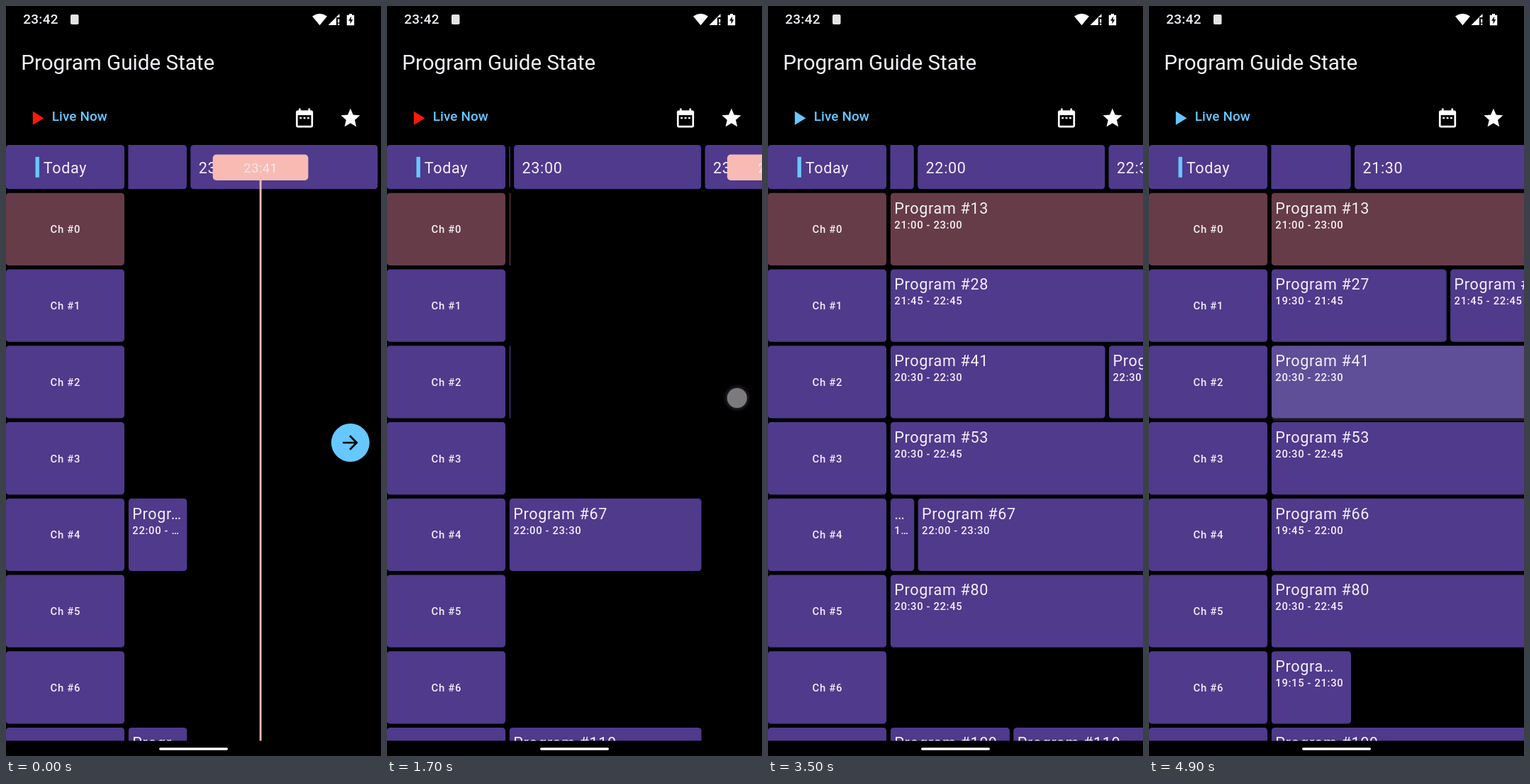
These frames come from a looping animation (529 px wide and 1058 px high, 5000 ms). An HTML page:

```html
<!DOCTYPE html>
<html lang="en">
<head>
<meta charset="utf-8">
<title>Program guide</title>
<style>
  html, body { margin: 0; width: 100%; height: 100%; overflow: hidden; background: #000; }
  #stage { display: block; width: 100vw; height: 100vh; }
  text { font-family: Roboto, sans-serif; fill: #f3f0f7; white-space: pre; }
  .body { font-size: 21.55px; letter-spacing: .67px; }
  .label { font-size: 14.8px; font-weight: 500; letter-spacing: .67px; }
</style>
</head>
<body>
<svg id="stage" viewBox="0 0 529 1058" xmlns="http://www.w3.org/2000/svg">
  <defs>
    <clipPath id="rowsClip"><rect y="190" width="529" height="846.5"/></clipPath>
    <clipPath id="gridClip"><rect x="172.4" y="190" width="357" height="846.5"/></clipPath>
    <radialGradient id="halo">
      <stop offset=".6" stop-color="#b4aad8" stop-opacity=".5"/>
      <stop offset="1" stop-color="#8070b0" stop-opacity="0"/>
    </radialGradient>
  </defs>
  <rect width="529" height="1058"/>

  <!-- status bar -->
  <text x="24.2" y="25.4" font-size="18.9" font-weight="500" letter-spacing=".35">23:42</text>
  <rect x="91" y="12" width="11.5" height="14" rx="2" fill="#e4e4e4"/>
  <g fill="#fff">
    <path d="M442.5 27.3L432 14.4Q442.5 7 453 14.4Z"/>
    <path d="M454.5 27L470.5 11V16H466V27ZM468 18.5h2.3v5h-2.3zM468 24.7h2.3v2.3h-2.3z"/>
    <path d="M484 11h4v1.7h3.2v14.5h-10.4V12.7H484z"/>
    <path d="M487.3 14.5L483 20.8h2.6V25.5L489.2 19h-2.5z" fill="#000"/>
  </g>

  <!-- app bar -->
  <text x="21.3" y="90.4" font-size="29.6">Program Guide State</text>
  <path id="play" d="M37.8 148.5L53.3 158.2L37.8 167.7Z"/>
  <text x="64.7" y="162.3" font-size="18.86" font-weight="500" letter-spacing=".13" style="fill:#66c8ff">Live Now</text>
  <g fill="#fff">
    <rect x="410.3" y="148.6" width="21.5" height="21.5" rx="1.5" fill="none" stroke="#fff" stroke-width="2.7"/>
    <path d="M410 148h22v6h-22zM413 144.6h2.7v4h-2.7zM426.4 144.6h2.7v4h-2.7z"/>
    <path d="M414.3 158h13.5" stroke="#fff" stroke-width="2.7" stroke-dasharray="2.7"/>
    <polygon id="star"/>
  </g>

  <g id="channels" clip-path="url(#rowsClip)"></g>
  <g id="grid" clip-path="url(#gridClip)"></g>

  <g id="fab">
    <circle cx="485.8" cy="616" r="27" fill="#66c8ff"/>
    <path d="M475 616h19M485 606.2l9.7 9.8l-9.7 9.8" fill="none" stroke="#000" stroke-width="2.7"/>
  </g>
  <g id="touch">
    <circle r="20" fill="url(#halo)"/>
    <circle r="14" fill="#e6e2e6"/>
  </g>
  <rect x="216" y="1046.3" width="97" height="3.4" rx="1.7" fill="#fff"/>
</svg>
<script>
const LOOP = 5000, STEP = 100;
const LEFT = 172.4, GAP = 5.4, PAD = 5.4, HALF_HOUR = 269.4;
const ROW_TOP = 263.7, ROW_PITCH = 107.75, ROW_H = 102.4;
const PURPLE = '#4f3a8c', HOVER = '#5f4e98', MAROON = '#663c48', PINK = '#f8bbb4', BLUE = '#66c8ff';

// Per channel: first program number, then the clock times that bound its programs.
const channels = [
  '13 21:00 23:00', '27 19:30 21:45 22:45', '41 20:30 22:30 23:00', '53 20:30 22:45',
  '66 19:45 22:00 23:30', '80 20:30 22:45', '93 19:15 21:30', '109 20:00 22:15 23:30'
];

// Each swipe moves the 23:30 mark to `to`; the finger lands at x, y.
const START_MARK = 260.3;
const swipes = [
  { start: 600, end: 1300, to: 358.7, x: 336, y: 600 },
  { start: 1500, end: 1900, to: 492.7, x: 404, y: 553 },
  { start: 2300, end: 2800, to: 785, x: 305, y: 630 },
  { start: 2900, end: 3500, to: 1019.4, x: 305, y: 630 },
  { start: 3500, end: 4200, to: 1273.6, x: 305, y: 630 },
  { start: 4200, end: 4900, to: 1367.6, x: 380, y: 535 }
];

const el = id => document.getElementById(id);
const pen = document.createElement('canvas').getContext('2d');
const fonts = {
  body: '21.55px Roboto, sans-serif',
  label: '500 14.8px Roboto, sans-serif'
};

const clamp = (v, lo, hi) => Math.min(Math.max(v, lo), hi);
const minutes = clock => { const [h, m] = clock.split(':'); return h * 60 + +m; };
const xOf = (min, mark) => mark + (min - 1410) * HALF_HOUR / 30;
const rowY = row => ROW_TOP + row * ROW_PITCH;
const rect = (x, y, w, h, fill, r = 4.5) =>
  `<rect x="${x}" y="${y}" width="${w}" height="${h}" rx="${Math.min(r, w / 2)}" fill="${fill}"/>`;
const text = (x, y, cls, str, extra = '') =>
  `<text x="${x}" y="${y}" class="${cls}" ${extra}>${str}</text>`;

// Quick drag, then a decelerating fling.
const fling = p => { const q = p ** .7; return q * q * (3 - 2 * q); };

const programs = channels.flatMap((line, row) => {
  const [first, ...times] = line.split(' ');
  return times.slice(1).map((end, i) => ({ row, number: +first + i, start: times[i], end }));
});

function textWidth(str, cls) {
  pen.font = fonts[cls];
  return pen.measureText(str).width + str.length * .67;
}

function ellipsize(str, cls, room) {
  if (textWidth(str, cls) <= room) return str;
  let n = str.length - 1;
  while (n > 0 && textWidth(str.slice(0, n) + '…', cls) > room) n--;
  return str.slice(0, n) + '…';
}

function stateAt(t) {
  const i = swipes.findLastIndex(s => t >= s.start);
  if (i < 0) return { mark: START_MARK, p: 1, x: 0, y: 0 };
  const { start, end, to, x, y } = swipes[i];
  const from = i ? swipes[i - 1].to : START_MARK;
  const p = clamp((t - start) / (end - start), 0, 1);
  const moved = (to - from) * fling(p);
  return { mark: from + moved, p, x: Math.min(x + moved, 500), y };
}

function programCell({ row, number, start, end }, { mark, p, x: px, y: py }) {
  const x = Math.max(xOf(minutes(start), mark), LEFT) + .4;
  const w = xOf(minutes(end), mark) + .4 - GAP - x;
  if (w <= 0 || x > 529) return '';
  const y = rowY(row), room = w - 2 * PAD;
  const hovered = p > .85 && px > x && px < x + w && py > y && py < y + ROW_H;
  const fill = hovered ? HOVER : row ? PURPLE : MAROON;
  let out = hovered ? rect(x + 1, y + 20, w, ROW_H - 16, '#1a191c') : '';
  out += rect(x, y, w, ROW_H, fill);
  if (room > 2) {
    out += `<svg x="${x + PAD + .1}" y="${y}" width="${room + 1}" height="${ROW_H}">` +
      text(0, 28.9, 'body', ellipsize('Program #' + number, 'body', room)) +
      text(0, 50, 'label', ellipsize(`${start} - ${end}`, 'label', room)) + '</svg>';
  }
  return out;
}

function timeline(mark) {
  let out = '';
  for (let m = 1230; m <= 1410; m += 30) {
    const x = xOf(m, mark);
    const clock = `${Math.floor(m / 60)}:${m % 60 ? '30' : '00'}`;
    out += rect(x, 196, HALF_HOUR - GAP, 62.3, PURPLE) + text(x + 11.4, 235.7, 'body', clock);
  }
  return out;
}

function nowMarker(mark) {
  const x = xOf(1421, mark);
  return rect(x - 1.4, 240, 2.8, 800, PINK, 0) + rect(x - 67.4, 209.6, 134.7, 36.3, PINK, 5) +
    text(x, 235, '', '23:41', 'font-size="18.86" letter-spacing=".2" text-anchor="middle" style="fill:#f0e8ed"');
}

function render(t) {
  const state = stateAt(t), { mark, p, x, y } = state;
  el('grid').innerHTML = timeline(mark) +
    programs.map(program => programCell(program, state)).join('') + nowMarker(mark);
  el('play').setAttribute('fill', mark < 498 ? '#fb1a08' : BLUE);
  el('fab').style.display = mark < 400 ? '' : 'none';
  el('touch').setAttribute('transform', `translate(${x} ${y})`);
  el('touch').setAttribute('opacity', p > 0 ? clamp((.68 - p) * 3, 0, .68) : 0);
}

function drawStatic() {
  let out = rect(-.2, 196, 167.2, 62.3, PURPLE) + rect(41.5, 212.8, 5.4, 29, BLUE, 0) +
    text(52.8, 235.7, 'body', 'Today');
  channels.forEach((_, i) => {
    out += rect(-.2, rowY(i), 167.2, ROW_H, i ? PURPLE : MAROON) +
      text(83.8, rowY(i) + 56.6, 'label', 'Ch #' + i, 'text-anchor="middle"');
  });
  el('channels').innerHTML = out;

  const star = Array.from({ length: 10 }, (_, i) => {
    const r = i % 2 ? 6.45 : 14.15, a = i * Math.PI / 5;
    return [485.9 + r * Math.sin(a), 158.7 - r * Math.cos(a)];
  });
  el('star').setAttribute('points', star.join(' '));
}

drawStatic();
const began = performance.now();
let shown = -1;
function tick() {
  const t = Math.floor((performance.now() - began) % LOOP / STEP) * STEP;
  if (t !== shown) render(shown = t);
  requestAnimationFrame(tick);
}
tick();
</script>
</body>
</html>
```
